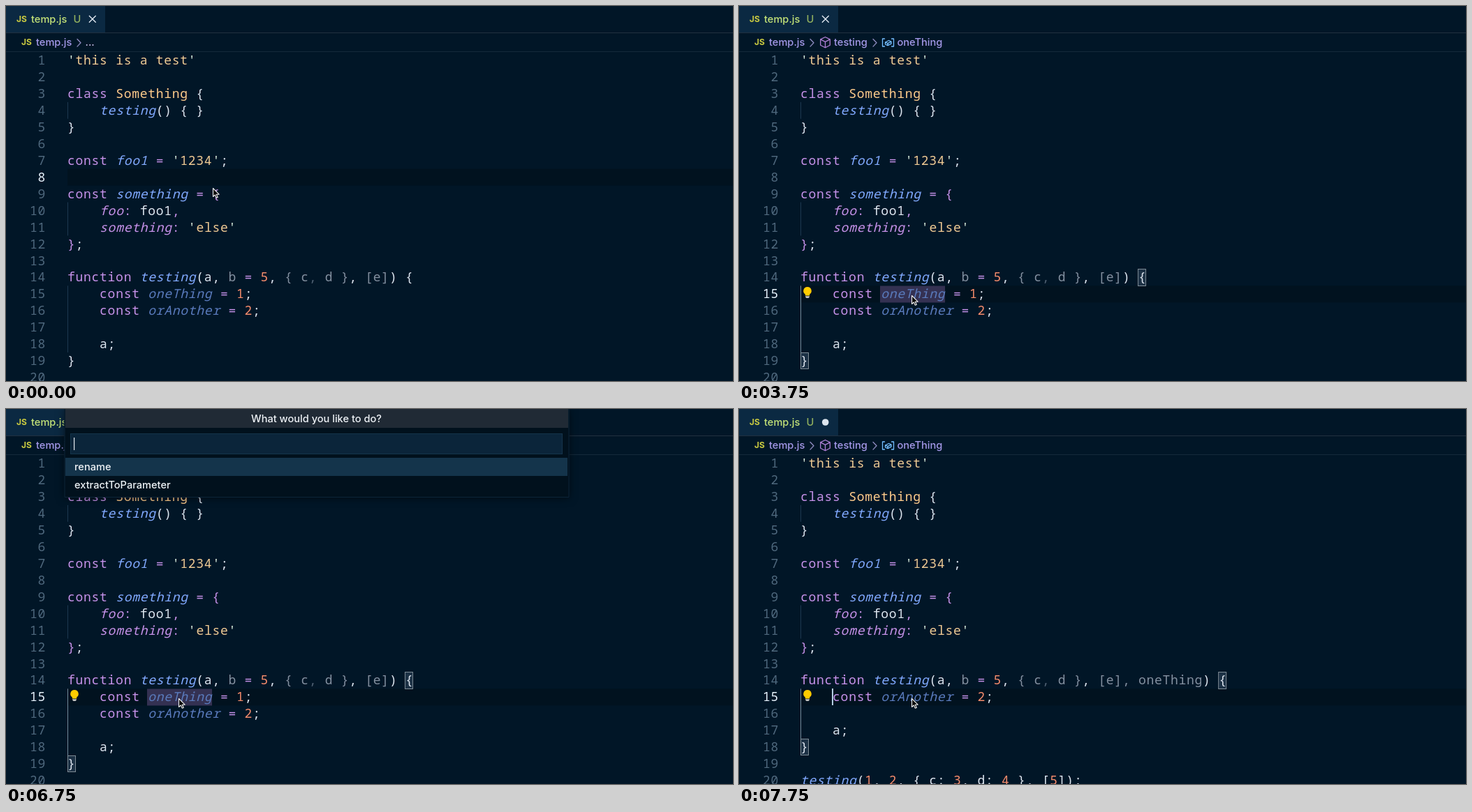
Write an HTML page that moves like this. It is 1041 by 538 pixels and loops after 8000 ms.

```html
<!DOCTYPE html>
<html lang="en">
<head>
<meta charset="utf-8">
<title>Code editor</title>
<style>
  html, body { margin: 0; width: 100%; height: 100%; overflow: hidden; background: #011627; }
  svg { display: block; width: 1041px; height: 538px; }
  text { white-space: pre; }
  .code text { font: 500 18px "Noto Sans Mono", "DejaVu Sans Mono", monospace; letter-spacing: .72px; fill: #dfe6f0; font-variant-ligatures: none; }
  .code .num { font-weight: 400; fill: #4f687d; text-anchor: end; }
  .code .num.on { font-weight: 500; fill: #e8f2fc; }
  .ui text { font: 500 14.6px Inter, "Open Sans", sans-serif; }
  .ui .js { font-size: 12px; font-weight: 700; fill: #cbcb41; }
  .k { fill: #c792ea; }
  .p { fill: #c792ea; font-style: italic; }
  .f { fill: #82aaff; font-style: italic; }
  .v { fill: #5a7bbd; font-style: italic; }
  .y { fill: #ffcb8b; }
  .s { fill: #f0ca94; }
  .q { fill: #e2f5e4; }
  .n { fill: #f78c6c; }
  .d { fill: #8490a0; }
  .x { fill: #4f6072; }
  .crumb { fill: #a599e9; }
  .line { fill: none; stroke-width: 1.3; stroke-linecap: round; stroke-linejoin: round; }
  #menu { filter: drop-shadow(0 1px 6px rgba(0, 0, 0, .5)); }
</style>
</head>
<body>
<svg viewBox="0 0 1041 538" xmlns="http://www.w3.org/2000/svg">
  <rect width="1041" height="538" fill="#011627"/>
  <rect id="row" x="88" width="953" height="24" fill="#01121f"/>
  <rect id="word" x="202" y="401.5" width="93" height="24" fill="#343152"/>
  <g id="brackets" fill="#1c3145" stroke="#7f8b95">
    <rect id="open" y="377.5" width="11" height="24"/>
    <rect id="close" x="88.5" width="11" height="23"/>
  </g>
  <g id="guides"></g>
  <g class="code">
    <g id="nums"></g>
    <g id="before"></g>
    <g id="after"></g>
  </g>
  <rect id="caret" y="401" width="2" height="24" fill="#b4cde2"/>
  <g id="bulb">
    <path d="M98 403a5.8 5.8 0 0 0-3.2 10.6v1.9h6.4v-1.9A5.8 5.8 0 0 0 98 403z" fill="#fc0"/>
    <path d="M95.2 416.3h5.6v1.2l-1.2 1.5h-3.2l-1.2-1.5z" fill="#c5c5c5"/>
  </g>

  <g class="ui">
    <rect width="142" height="38" fill="#0b2942"/>
    <rect y="38" width="1041" height="1" fill="#22303f"/>
    <rect y="65" width="1041" height="1" fill="#15293a"/>
    <text class="js" x="15" y="23">JS</text>
    <text x="36" y="24" fill="#c5e478">temp.js</text>
    <text x="96.5" y="23.5" fill="#93b25f">U</text>
    <path id="cross" class="line" stroke="#e6edf5" d="M119.3 14.3l9 9m0-9l-9 9"/>
    <circle id="dirty" cx="123.7" cy="19" r="4.8" fill="#dde5ee"/>
    <text class="js" x="22" y="56">JS</text>
    <text class="crumb" x="43" y="57">temp.js</text>
    <path class="line" stroke="#8f8cc0" d="M102 47.5l5 5.3-5 5.3"/>
    <text id="dots" x="113.5" y="57" fill="#c9c4ee">...</text>
    <g id="path">
      <path class="line" stroke="#b180d7" d="M123.5 44.5l6.8 3.3v8.4l-6.8 3.6-6.8-3.6v-8.4zM116.7 47.8l6.8 3.5 6.8-3.5M123.5 51.3v8.5"/>
      <text class="crumb" x="136" y="57">testing</text>
      <path class="line" stroke="#8f8cc0" d="M192 47.5l5 5.3-5 5.3"/>
      <path class="line" stroke="#75beff" d="M208.5 47h-3v11h3M218.5 47h3v11h-3M209.5 52l5-2.5 3.5 1.7v3l-5 2.5-3.5-1.7zl3.5 1.7 5-2.5M213 53.7v3"/>
      <text class="crumb" x="226.5" y="57">oneThing</text>
    </g>
  </g>

  <g id="menu" class="ui" fill="#eef2f6">
    <rect x="83.5" width="723" height="127" fill="#01111d"/>
    <path d="M84 0v126.5h722V0" fill="none" stroke="#0d2538"/>
    <rect x="85" width="720" height="27" fill="#202a35"/>
    <text x="444.5" y="18.5" text-anchor="middle">What would you like to do?</text>
    <rect x="92.5" y="35.5" width="704" height="29" fill="#0b253a" stroke="#14344b"/>
    <rect id="menuCaret" x="97" y="41" width="1.2" height="18" fill="#e4e9ef"/>
    <rect id="pick" x="85" width="719" height="26" fill="#14344b"/>
    <text x="98" y="88">rename</text>
    <text x="98" y="114">extractToParameter</text>
  </g>

  <path id="mouse" d="M.5.5v12l2.8-2.5 2 4.3 2-.9-2-4.2h3.8z" fill="#0a0a0a" stroke="#f2f2f2" stroke-width="1.1" stroke-linejoin="round"/>
</svg>
<script>
const $ = id => document.getElementById(id);
const LOOP = 8000, PITCH = 23.95, LEFT = 88, COL = 11.52;
const rowTop = n => 66 + PITCH * (n - 1);
const baseline = n => rowTop(n) + 18.1;

// Each piece between bars starts with its colour class; "-" is plain text.
const head = [
  "q'|sthis is a test|q'",
  "",
  "kclass |ySomething|- {",
  "-    |ftesting|-() { }",
  "-}",
  "",
  "kconst |ffoo1|k = |q'|s1234|q'|-;",
  "",
  "kconst |fsomething|k = {",
  "-    |pfoo|k:|- foo1|k,",
  "-    |psomething|k:|- |q'|selse|q'",
  "k}|-;",
  ""
];
const sign = "kfunction |ftesting|-(a, |db|k = |n5|-, |d{ c|x,|d d }|-, |d[e]";
const another = "-    |kconst |vorAnother|k = |n2|-;";
const tail = [another, "", "-    a;", "-}"];
const before = [...head, sign + "|-) {", "-    |kconst |voneThing|k = |n1|-;", ...tail];
const after = [...head, sign + "|d, oneThing|-) {", ...tail, "",
  "ftesting|-(|n1|-, |n2|-, { c: |n3|-, d: |n4|- }, [|n5|-]);"];

const span = part => `<tspan class="${part[0]}">${part.slice(1)}</tspan>`;
const draw = lines => lines.map((line, i) => line &&
  `<text xml:space="preserve" x="${LEFT}" y="${baseline(i + 1)}">${line.split("|").map(span).join("")}</text>`).join("");

$("before").innerHTML = draw(before);
$("after").innerHTML = draw(after);
$("nums").innerHTML = Array.from({ length: 20 }, (_, i) =>
  `<text class="num" x="57" y="${baseline(i + 1)}">${i + 1}</text>`).join("");
$("guides").innerHTML = [[4, 1], [10, 2], [15, 4]].map(([n, rows]) =>
  `<rect x="88" y="${rowTop(n)}" width="1" height="${PITCH * rows}" fill="#1d3850"/>`).join("");

const nums = [...$("nums").children];
const block = $("guides").lastElementChild;
const mouse = [[0, 296, 261], [250, 255, 322], [500, 243.5, 406], [750, 247, 415]];

const show = (id, on) => { $(id).style.display = on ? "" : "none"; };
const set = (el, name, value) => el.setAttribute(name, value);
const blink = (t, start) => Math.floor((t - start) / 500) % 2 === 0;

function render(t) {
  const clicked = t >= 1250, ready = t >= 1500;
  const menu = t >= 5750 && t < 7500, done = t >= 7750;
  const active = clicked ? 15 : 8;

  set($("row"), "y", rowTop(active));
  nums.forEach((el, i) => el.classList.toggle("on", i + 1 === active));
  show("word", ready && !done);
  show("bulb", ready);
  show("path", ready);
  show("dots", !ready);

  show("before", !done);
  show("after", done);
  show("cross", !done);
  show("dirty", done);
  show("brackets", clicked);
  set($("open"), "x", LEFT + COL * (done ? 52 : 42) - .4);
  set($("close"), "y", Math.floor(rowTop(done ? 18 : 19)) + .5);
  set(block, "height", PITCH * (done ? 3 : 4));
  set(block, "fill", clicked ? "#75899a" : "#1d3850");

  show("caret", clicked && !menu && (t >= 7500 || blink(t, 1250)));
  set($("caret"), "x", done ? 133 : 248);

  show("menu", menu);
  show("menuCaret", menu && blink(t, 5750));
  set($("pick"), "y", t < 7000 ? 70 : 96);

  const [, x, y] = mouse.filter(m => m[0] <= t).pop();
  set($("mouse"), "transform", `translate(${x} ${y})`);
}

const start = performance.now();
function tick() {
  render((performance.now() - start) % LOOP);
  requestAnimationFrame(tick);
}
render(0);
requestAnimationFrame(tick);
</script>
</body>
</html>
```
